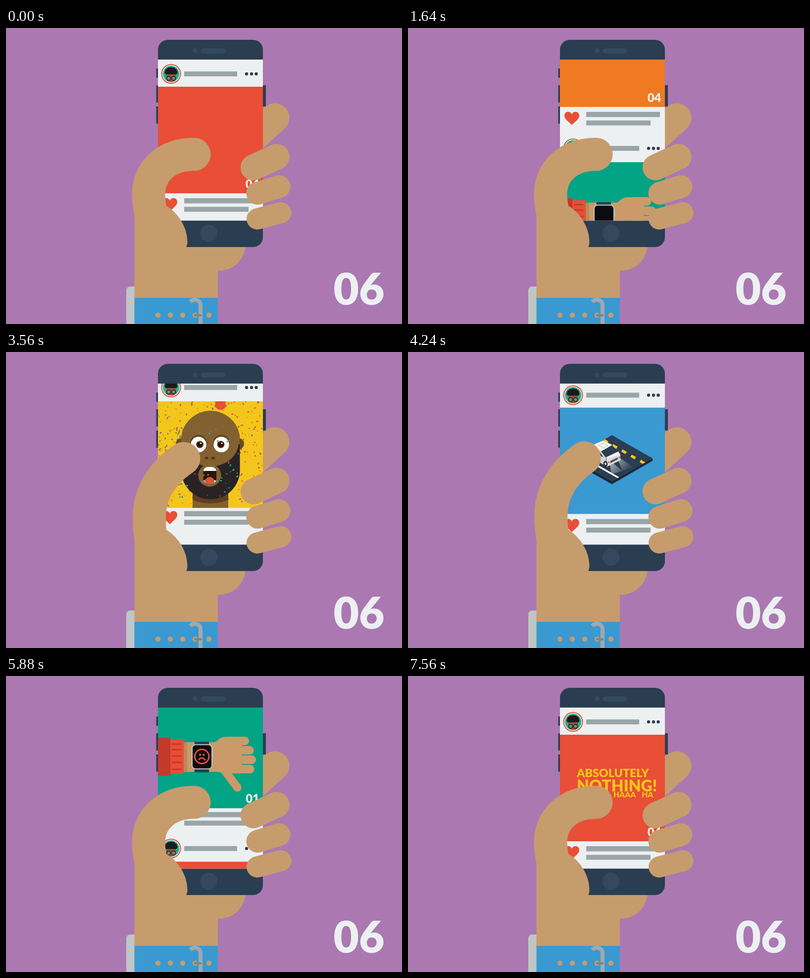
These frames come from a looping animation (800 by 600 pixels, 7.6 s). An HTML page with a canvas:

```html
<!DOCTYPE html>
<html lang="en">
<head>
<meta charset="utf-8">
<title>Feed scroll</title>
<style>
html, body { margin: 0; width: 100%; height: 100%; overflow: hidden; background: #ab78b2; }
canvas { display: block; }
</style>
</head>
<body>
<canvas id="stage" width="800" height="600"></canvas>
<script>
const ctx = document.getElementById('stage').getContext('2d');
const LOOP = 7600, TAU = Math.PI * 2;
const C = {
  bg: '#ab78b2', navy: '#2b3d51', slate: '#34495e', paper: '#ecf0f1', red: '#e94e36',
  green: '#03a386', yellow: '#f3c61b', blue: '#3a99d1', skin: '#c69c6d', gray: '#99a5a7',
  darkRed: '#c5392a', brown: '#836030', beard: '#2a2326', ink: '#1d1a1c', arm: '#cc9a68'
};

const clamp = v => Math.max(0, Math.min(1, v));
const mix = (a, b, u) => a + (b - a) * u;
const span = (t, a, b) => clamp((t - a) / (b - a));
const sine = u => (1 - Math.cos(Math.PI * u)) / 2;
const outQuad = u => 1 - (1 - u) * (1 - u);

function rect(x, y, w, h, fill, r = 0) {
  ctx.fillStyle = fill;
  ctx.beginPath();
  ctx.roundRect(x, y, w, h, r);
  ctx.fill();
}
function oval(x, y, rx, fill, ry = rx, rot = 0) {
  ctx.fillStyle = fill;
  ctx.beginPath();
  ctx.ellipse(x, y, rx, ry, rot, 0, TAU);
  ctx.fill();
}
function poly(fill, ...p) {
  ctx.fillStyle = fill;
  ctx.beginPath();
  for (let i = 0; i < p.length; i += 2) ctx.lineTo(p[i], p[i + 1]);
  ctx.closePath();
  ctx.fill();
}
function line(x1, y1, x2, y2, w, color, cap = 'round') {
  ctx.strokeStyle = color;
  ctx.lineWidth = w;
  ctx.lineCap = cap;
  ctx.beginPath();
  ctx.moveTo(x1, y1);
  ctx.lineTo(x2, y2);
  ctx.stroke();
}
function ring(x, y, r, w, color, a = 0, b = TAU) {
  ctx.strokeStyle = color;
  ctx.lineWidth = w;
  ctx.lineCap = 'round';
  ctx.beginPath();
  ctx.arc(x, y, r, a, b);
  ctx.stroke();
}
function text(str, x, y, size, fill, align = 'left') {
  ctx.font = `900 ${size}px Lato, "Open Sans", sans-serif`;
  ctx.textAlign = align;
  ctx.fillStyle = fill;
  ctx.fillText(str, x, y);
}
function group(fn) {
  ctx.save();
  fn();
  ctx.restore();
}
function keyed(t, keys) {
  let prev = keys[0];
  for (const k of keys) {
    if (t < k[0]) return mix(prev[1], k[1], sine(span(t, prev[0], k[0])));
    prev = k;
  }
  return prev[1];
}

// Scroll offset and thumb bend (0 resting, 1 raised, 2 fully raised)
const scrollKeys = [
  [0, 0], [1340, 0], [1915, 326], [2080, 326], [2540, 651.5], [2680, 651.5], [3080, 978],
  [3480, 978], [3980, 1309], [4200, 1309], [4320, 1330], [4560, 1309], [4900, 1309],
  [5040, 1340], [5300, 1309]
];
const thumbKeys = [
  [0, 0], [1220, 0], [1400, 1], [1620, 0], [1960, 0], [2120, 1], [2340, 0], [2620, 0],
  [2790, 1], [2830, 1], [3060, 0], [3400, 0], [3560, 1], [3640, 1.6], [3860, 0],
  [4140, 0], [4320, 1.8], [4560, 0], [4860, 0], [5030, 2], [5060, 2], [5400, 0]
];
const scrollAt = t => t < 5400 ? keyed(t, scrollKeys) : 1309 * (1 - outQuad(span(t, 5400, 6467)));

// Centre line of the thumb in each pose
const poses = [
  [380, 256, 325, 256, 288, 290, 288, 337, 288, 350, 290, 362],
  [359, 216, 318, 243, 289, 285, 289.5, 335, 289.5, 350, 290, 362],
  [320, 196, 294, 229, 279.5, 262, 279.5, 298, 279.5, 325, 285, 350]
];
function thumb(p) {
  const i = p < 1 ? 0 : 1;
  const q = poses[i].map((v, k) => mix(v, poses[i + 1][k], p - i));
  ctx.strokeStyle = C.skin;
  ctx.lineWidth = 67;
  ctx.lineCap = 'round';
  ctx.beginPath();
  ctx.moveTo(q[0], q[1]);
  ctx.bezierCurveTo(...q.slice(2, 8));
  ctx.bezierCurveTo(...q.slice(8, 12), 292, 372);
  ctx.stroke();
}

function header(y) {
  const m = y + 29;
  oval(333.5, m, 20, C.red);
  oval(333.5, m, 18, C.paper);
  group(() => {
    ctx.beginPath();
    ctx.arc(333.5, m, 16.5, 0, TAU);
    ctx.clip();
    rect(317, m - 17, 33, 34, '#17b595');
    rect(323.5, m - 4, 20, 20, '#8a5a3a', 8);
    for (let k = 0; k < 7; k++) {
      const a = Math.PI * (1 + k / 6);
      oval(333.5 + 9 * Math.cos(a), m - 3 + 7 * Math.sin(a), 4, C.ink);
    }
    rect(323, m - 9, 21, 10, C.ink, 3);
    for (const x of [328.5, 338.5]) {
      oval(x, m + 9, 4, '#7d8583');
      ring(x, m + 9, 4, 1.6, C.ink);
    }
  });
  rect(360, m - 5, 107, 10, C.gray);
  for (const x of [486, 496, 505.5]) oval(x, m, 3.2, C.navy);
}

function footer(y) {
  rect(360, y - 5, 149, 10.5, C.gray);
  rect(360, y + 12.5, 130, 10, C.gray);
  group(() => {
    ctx.translate(331, y + 8);
    ctx.fillStyle = C.red;
    ctx.beginPath();
    ctx.moveTo(0, 13.5);
    ctx.bezierCurveTo(-5, 8, -15, 2, -15, -5);
    ctx.bezierCurveTo(-15, -15, -3, -16, 0, -8);
    ctx.bezierCurveTo(3, -16, 15, -15, 15, -5);
    ctx.bezierCurveTo(15, 2, 5, 8, 0, 13.5);
    ctx.fill();
  });
}

// Each scene draws on a panel of 212 by 216 whose left edge is x = 307
function joke(t) {
  if (t > 6000) {
    const pop = (str, y, size, start) => group(() => {
      const u = outQuad(span(t, start, start + 180));
      if (!u) return;
      ctx.translate(419, y - 9);
      ctx.scale(u, u);
      text(str, -78, 9, size, C.yellow);
    });
    pop('ABSOLUTELY', 86, 23.2, 6500);
    pop('NOTHING!', 115, 32, 6680);
    [['HA', 357], ['HAAA', 415], ['HA', 472]].forEach(([word, x], i) => {
      if (t < 6840 + i * 110) return;
      group(() => {
        const wave = Math.sin((t - 7560) / 60) * (i % 2 ? 1 : -1);
        ctx.translate(x, 126.5 + wave * 3);
        ctx.rotate(i === 2 ? 0.05 : 0);
        text(word, 0, 0, 15.6, C.yellow);
      });
    });
  }
  text('04', 511.5, 206, 24, C.paper, 'right');
}

function watch(t) {
  rect(307, 73, 25, 77, C.darkRed);
  rect(332, 77, 27, 69, C.red);
  for (const y of [86, 97, 110, 123, 137]) line(336, y, 353, y, 3.2, C.darkRed);
  rect(359, 82, 76, 60, C.arm);
  rect(359, 82, 7, 60, '#b78a59');
  ctx.fillStyle = C.arm;
  ctx.beginPath();
  ctx.moveTo(420, 82);
  ctx.bezierCurveTo(428, 82, 428, 71, 446, 71);
  ctx.lineTo(476, 71);
  ctx.lineTo(476, 145);
  ctx.lineTo(440, 145);
  ctx.lineTo(420, 140);
  ctx.fill();
  [482.5, 492, 496.5, 493].forEach((x, i) => line(455, 79.5 + i * 19, x, 79.5 + i * 19, 17.4, C.arm));
  line(443, 141, 467.5, 174, 16.5, C.arm);
  rect(381, 81, 29, 62, C.navy);
  rect(414, 99, 5, 12, '#aab0b2', 2);
  rect(375, 86, 42, 51, '#bfc5c6', 8);
  rect(377, 88, 38, 47, '#0b0b10', 6);
  const u = outQuad(span(t, 1860, 2060));
  if (u) group(() => {
    ctx.translate(395.7, 111);
    ctx.scale(u, u);
    ring(0, 0, 14.3, 3, C.red);
    oval(-3.5, -3.5, 2.2, C.red);
    oval(3.5, -3.5, 2.2, C.red);
    ring(0, 10, 7, 2.8, C.red, Math.PI * 1.2, Math.PI * 1.85);
  });
  text('01', 512, 205, 24, C.paper, 'right');
}

function counter(t) {
  const n = Math.max(0, Math.min(99, 73 - Math.floor((t - 2800) / 40)));
  rect(358, 57, 111, 110, '#b9372a', 5);
  rect(357.5, 52.5, 111, 111, C.yellow, 5);
  rect(366, 63, 95, 94.5, '#c79a16', 6);
  rect(366, 61, 94, 94, '#fff', 6);
  const ink = ctx.createLinearGradient(0, 94, 0, 124);
  ink.addColorStop(0, '#2b3d51');
  ink.addColorStop(1, '#2f5575');
  ctx.letterSpacing = '-3px';
  text(String(n).padStart(2, '0'), 411.5, 123.5, 41, ink, 'center');
  ctx.letterSpacing = '0px';
  rect(366, 108, 94, 1, 'rgba(120,160,170,.55)');
  rect(372, 101.5, 4.5, 14, C.red, 1.5);
  rect(449.5, 101.5, 4.5, 14, C.red, 1.5);
  text('00', 511.5, 205.5, 24, C.yellow, 'right');
}

function confetti(t, count, seed, colors, area) {
  const rnd = () => (seed = (seed * 16807) % 2147483647) / 2147483647;
  const u = outQuad(span(t, 2750, 3300));
  for (let i = 0; i < count; i++) {
    const x = area[0] + rnd() * area[2], y = area[1] + rnd() * area[3];
    const size = 0.7 + rnd() * 1.3, rot = rnd() * 3, fall = 0.006 + rnd() * 0.016;
    const color = colors[Math.floor(rnd() * colors.length)];
    oval(mix(433, x, u), mix(4, y, u) + (t - 3560) * fall, size * 0.8, color, size * 1.3, rot);
  }
}

function face(t) {
  confetti(t, 300, 77, [C.red, C.red, '#e8772a', '#c4622a', '#8d5a86'], [308, 0, 210, 216]);
  confetti(t, 45, 915, ['#2b9c85', '#2b9c85', '#4d7f8c'], [309, 55, 50, 155]);
  for (let i = 0; i < 6; i++) oval(425 + i * 3.4, 9 + 5 * Math.sin(i * 0.63), 3.5, C.red);
  rect(423, 0, 20, 10, C.red);
  rect(377, 170, 72, 46, C.brown);
  ctx.fillStyle = '#5f3f22';
  ctx.beginPath();
  ctx.ellipse(413, 170, 60, 37, 0, 0, Math.PI);
  ctx.save();
  ctx.clip();
  rect(377, 170, 72, 46, '#5f3f22');
  ctx.restore();
  oval(353, 86, 10, '#6d4a28', 11);
  oval(471, 86, 10, '#6d4a28', 11);
  group(() => {
    ctx.beginPath();
    ctx.roundRect(354, 19.5, 118.5, 179, 59);
    ctx.clip();
    rect(350, 15, 126, 190, C.beard);
    rect(350, 15, 126, 72, C.brown);
    oval(413, 83, 57, C.brown, 49);
  });
  for (const x of [389, 435]) {
    oval(x, 85, 17, '#5f3f22', 17);
    oval(x, 87.5, 15.7, '#fff');
  }
  for (const x of [391.5, 434]) {
    oval(x, 87.5, 7.3, '#4b2410');
    oval(x, 87.5, 4, '#1d0d07');
    oval(x + 2, 85, 1.5, '#fff');
  }
  oval(405, 115, 4, '#5f3520', 2.7);
  oval(418.5, 115, 4, '#5f3520', 2.7);
  oval(411.5, 150, 23, C.brown);
  group(() => {
    ctx.beginPath();
    ctx.roundRect(398.5, 133, 26.5, 33.5, 9);
    ctx.clip();
    rect(398, 132, 28, 36, '#2c1309');
    rect(398, 132, 28, 9, '#fff');
    rect(398, 160, 28, 8, '#fff');
    oval(411.5, 162, 9.5, C.red, 8.5);
  });
  confetti(t, 70, 4021, ['#1fa488', '#27ae90', '#3f9a78', '#b0522c'], [345, 45, 125, 150]);
}

function car(t) {
  poly('#1b2836', 330, 103, 412, 149.5, 494, 103, 494, 108, 412, 155.5, 330, 109);
  group(() => {
    ctx.beginPath();
    ctx.moveTo(412, 56);
    ctx.lineTo(494, 103);
    ctx.lineTo(412, 149.5);
    ctx.lineTo(330, 103);
    ctx.clip();
    rect(330, 50, 170, 110, C.navy);
    line(343, 95, 428, 144, 3.6, '#fff', 'butt');
    ctx.setLineDash([10, 11.4]);
    ctx.lineDashOffset = -((t - 5040) * 0.06) - 5;
    line(395, 66, 486, 118, 5.5, C.yellow, 'butt');
    ctx.setLineDash([]);
  });
  const beam = ctx.createLinearGradient(410, 108, 436, 132);
  beam.addColorStop(0, 'rgba(255,255,255,.6)');
  beam.addColorStop(1, 'rgba(255,255,255,.08)');
  poly(beam, 408, 116, 414, 112, 433, 129, 411, 135);
  poly(beam, 424, 106, 429, 103, 455, 121, 433, 128);
  poly('#1b2836', 370, 100, 400, 119, 428, 107, 424, 104, 398, 112);
  poly('#cfd5d4', 371, 77, 390, 89, 400, 102, 402, 120, 369, 101);
  poly('#2b3d51', 371, 81, 388, 91, 395, 101, 371, 90);
  line(379, 85, 380, 95, 1.6, '#cfd5d4', 'butt');
  poly('#f3f5f4', 371, 77, 394, 67, 413, 76, 390, 89);
  ctx.strokeStyle = '#aab4b5';
  ctx.lineWidth = 0.9;
  ctx.beginPath();
  for (const [x, y] of [[385, 77], [394, 72.5], [404, 77], [395, 82]]) ctx.lineTo(x, y);
  ctx.closePath();
  ctx.stroke();
  poly('#2b3d51', 391, 89, 412, 76.5, 424, 89, 401, 101);
  poly('#f3f5f4', 400, 101, 425, 89, 429, 96, 404, 109);
  poly('#d9dedd', 401, 104, 429, 95, 429, 107, 402, 120);
  poly('#4c5964', 409, 108, 424, 101, 424, 105, 409, 113);
  oval(406, 111, 1.8, C.red);
  oval(427, 101, 1.8, C.red);
  for (const [x, y] of [[374.5, 101], [399, 114]]) {
    oval(x, y, 4.2, C.ink, 5.5, -0.25);
    oval(x, y, 2.1, '#c8cecf', 2.8, -0.25);
  }
}

// head: header top, top: panel top, foot: first caption line below the panel
const posts = [
  { head: 64, top: 119, foot: 15, draw: joke },
  { head: 390, top: 447, foot: 12.5, draw: watch, fill: C.green },
  { head: 715.5, top: 771, foot: 14, draw: counter, fill: C.red },
  { head: 1042, top: 1099, foot: 11.5, draw: face, fill: C.yellow },
  { head: 1373, top: 1427, foot: 15, draw: car, fill: C.blue }
];

function feed(t) {
  const s = scrollAt(t);
  const u = t < 5400 ? span(t, 0, 800) : 0;
  const tint = `rgb(${mix(233, 239, u)},${mix(78, 122, u)},${mix(54, 33, u)})`;
  for (const p of posts) {
    if (p.head - s > 392 || p.top - s + 300 < 64) continue;
    header(p.head - s);
    group(() => {
      ctx.translate(0, p.top - s);
      ctx.beginPath();
      ctx.rect(307, 0, 212, 216);
      ctx.clip();
      rect(307, 0, 212, 216, p.fill || tint);
      p.draw(t);
    });
    footer(p.top - s + 216 + p.foot);
  }
}

function phone(t) {
  for (const [y, h] of [[82, 19], [116, 35], [159, 35]]) rect(303.5, y, 6, h, C.navy);
  rect(515, 116, 10, 43, C.navy);
  rect(307, 24, 212, 420, C.navy, 20);
  oval(382, 46.5, 5, C.slate);
  rect(393.5, 41, 49.5, 11, C.slate, 5.5);
  oval(410, 416, 17.3, C.slate);
  group(() => {
    ctx.beginPath();
    ctx.rect(307, 64, 212, 326.5);
    ctx.clip();
    rect(307, 64, 212, 327, C.paper);
    feed(t);
  });
}

function hand(t) {
  line(500, 282.5, 546.5, 261, 52.5, C.skin);
  line(508.5, 335, 551.5, 321.5, 46, C.skin);
  line(507.5, 387, 555, 374.5, 43, C.skin);
  ctx.fillStyle = C.skin;
  ctx.beginPath();
  ctx.moveTo(259.5, 376);
  ctx.lineTo(325, 361);
  ctx.bezierCurveTo(350, 377, 367, 406, 366.5, 436);
  ctx.lineTo(364.5, 444);
  ctx.lineTo(428, 444);
  ctx.lineTo(428, 548);
  ctx.lineTo(259.5, 548);
  ctx.fill();
  thumb(keyed(t, thumbKeys));
}

function strap() {
  rect(243, 524, 30, 90, '#bfc6c5', 8);
}
function band() {
  rect(259.5, 547, 168.5, 53, C.blue);
  for (const x of [307, 332, 357, 382, 410]) oval(x, 582, 5.2, C.skin);
  ctx.strokeStyle = '#a2a9aa';
  ctx.lineWidth = 8;
  ctx.lineCap = 'butt';
  ctx.beginPath();
  ctx.moveTo(372, 555);
  ctx.bezierCurveTo(379, 548, 393, 550, 393, 562);
  ctx.lineTo(393, 600);
  ctx.stroke();
  rect(380, 580, 15, 4.5, '#7b8584', 1);
}

function render(t) {
  rect(0, 0, 800, 600, C.bg);
  line(543, 182, 480, 239.5, 59, C.skin);
  oval(430, 438, 54, C.skin);
  phone(t);
  strap();
  hand(t);
  band();
  text('06', 661.5, 561, 89, C.paper);
}

const start = performance.now();
function tick() {
  render((performance.now() - start) % LOOP);
  requestAnimationFrame(tick);
}
tick();
</script>
</body>
</html>
```
